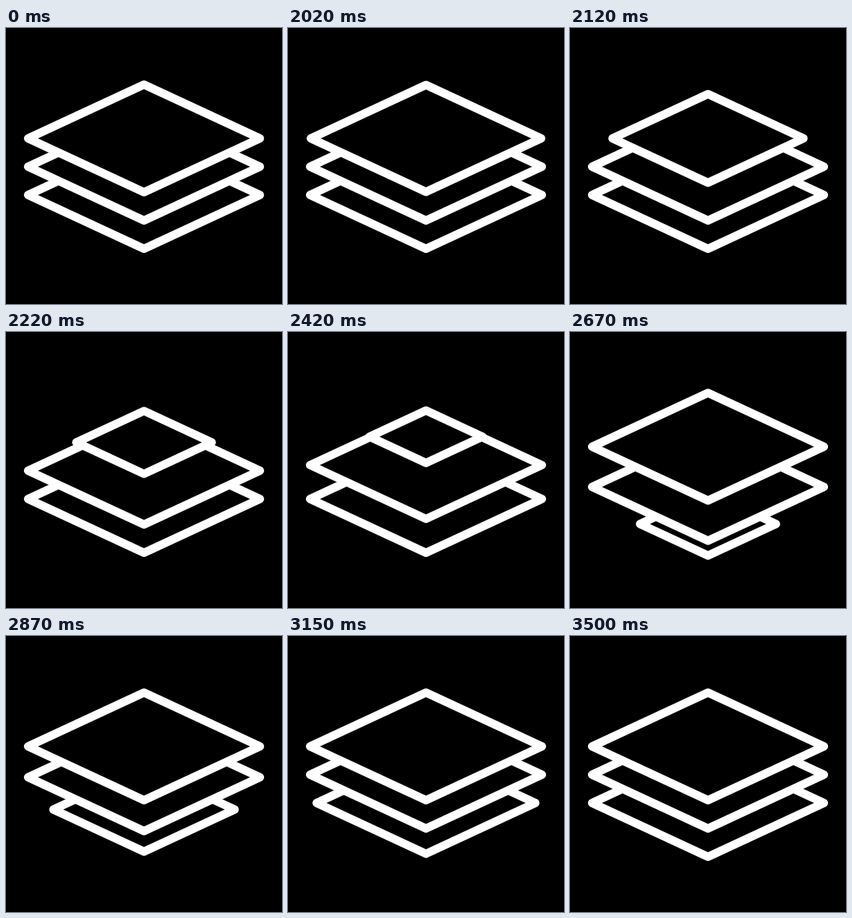
Recreate the animation shown at these times as an HTML page. Size 400 px wide and 400 px high, loop 3.52 s.

```html
<!DOCTYPE html>
<html lang="en">
<head>
<meta charset="utf-8">
<title>Layers</title>
<style>
  html, body { margin: 0; width: 100%; height: 100%; overflow: hidden; background: #000; }
  svg { display: block; width: 100vw; height: 100vh; }
  path { fill: #000; stroke: #fff; stroke-width: 12; stroke-linejoin: round; }
</style>
</head>
<body>
<svg viewBox="0 0 400 400">
  <g id="stack">
    <path id="low"/>
    <path id="mid"/>
    <path id="card"/>
  </g>
</svg>
<script>
const LOOP = 3520, STEP = 25;
const HALF_W = 168, HALF_H = 78;
const TOP = 160, MID = 201, LOW = 242;
const SMALL = 0.487;
const SWAP = 2557; // the card leaves the top and returns below the stack

const [stack, low, mid, card] = ['stack', 'low', 'mid', 'card'].map(id => document.getElementById(id));

const lerp = (a, b, p) => a + (b - a) * p;
const span = (t, start, length) => Math.min(1, Math.max(0, (t - start) / length));
const smooth = p => p * p * (3 - 2 * p);
const easeOut = p => 1 - (1 - p) ** 2;

function bezier(x1, y1, x2, y2) {
  const at = (u, a, b) => 3 * (1 - u) ** 2 * u * a + 3 * (1 - u) * u * u * b + u ** 3;
  return x => {
    let lo = 0, hi = 1;
    for (let i = 0; i < 24; i++) {
      const u = (lo + hi) / 2;
      if (at(u, x1, x2) < x) lo = u; else hi = u;
    }
    return at(hi, y1, y2);
  };
}
const grow = bezier(0.25, 0.42, 0.43, 1);

function diamond(el, y, scale = 1) {
  const w = HALF_W * scale, h = HALF_H * scale;
  el.setAttribute('d', `M200 ${y - h}L${200 + w} ${y}L200 ${y + h}L${200 - w} ${y}Z`);
}

function draw(time) {
  const t = Math.floor((time + 5) / STEP) * STEP - 5;

  diamond(mid, lerp(MID, TOP, smooth(span(t, 2267, 534))));
  diamond(low, lerp(LOW, MID, smooth(span(t, 2422, 550))));

  if (t < SWAP) {
    const lift = 53 * span(t, 2275, 270) ** 3;
    diamond(card, TOP - lift, lerp(1, SMALL, smooth(span(t, 2000, 305))));
    if (stack.lastElementChild !== card) stack.append(card);
  } else {
    const y = lerp(298, LOW, easeOut(span(t, 2570, 510)));
    diamond(card, y, lerp(SMALL, 1, grow(span(t, 2570, 930))));
    if (stack.firstElementChild !== card) stack.prepend(card);
  }
}

const begin = performance.now();
function tick() {
  draw((performance.now() - begin) % LOOP);
  requestAnimationFrame(tick);
}
tick();
</script>
</body>
</html>
```
